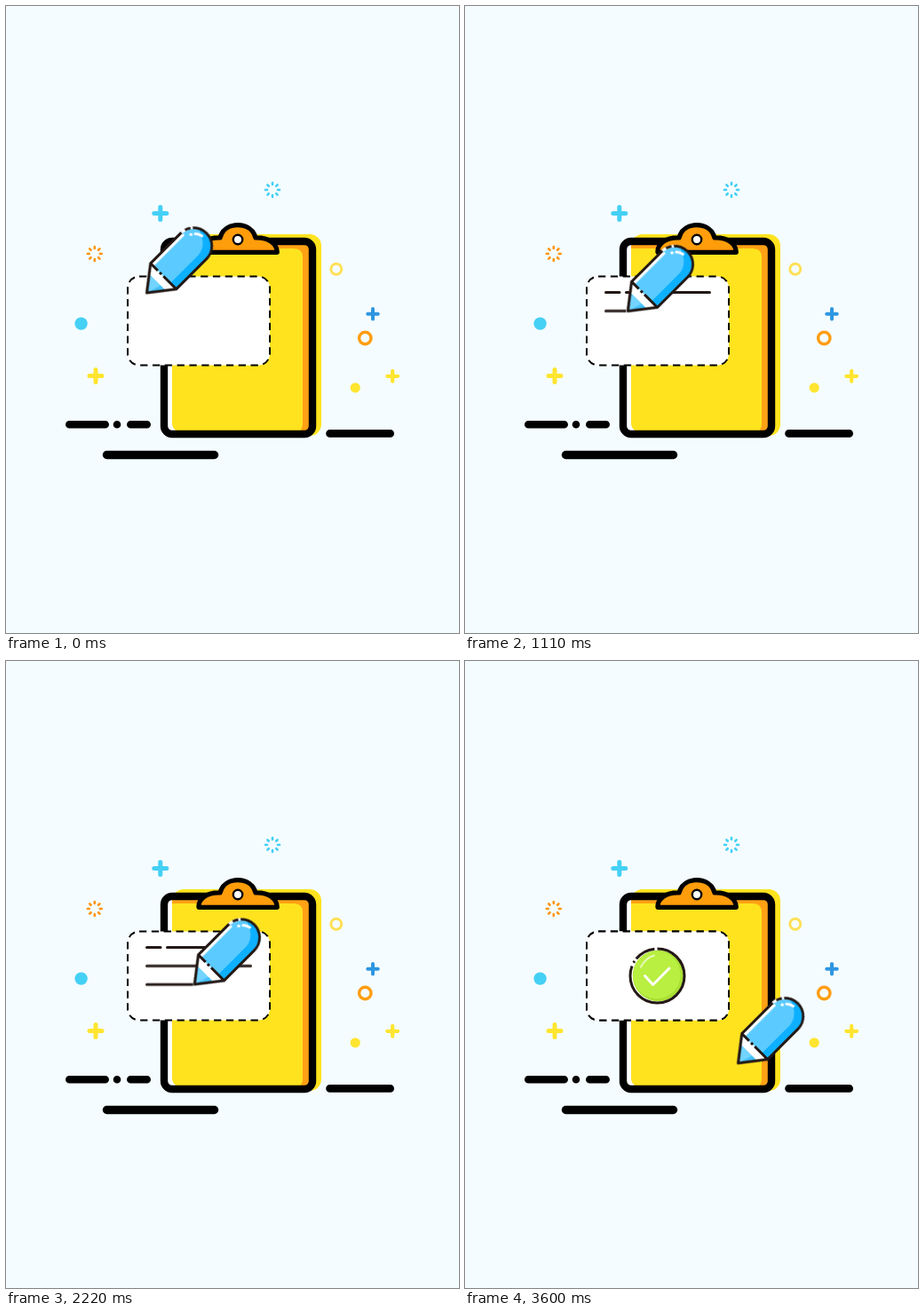
An HTML page for the animation above (5.22 s loop, 510 by 706 pixels).

```html
<!DOCTYPE html>
<html lang="en">
<head>
<meta charset="utf-8">
<title>Clipboard</title>
<style>
  html, body { margin: 0; width: 100%; height: 100%; overflow: hidden; background: #f4fcff; }
  svg { display: block; width: 100%; height: 100%; }
  .round { fill: none; stroke-linecap: round; stroke-linejoin: round; }
  .ink { stroke: #231815; stroke-width: 3; }
  .white { stroke: #fff; stroke-width: 3; }
  .card { fill: #fff; stroke: #000; stroke-width: 2; stroke-dasharray: 8.3 5.52; }
  .cover { fill: #fff; transform-origin: 284px 0; }
</style>
</head>
<body>
<svg viewBox="0 0 510 706">
  <rect width="510" height="706" fill="#f4fcff"/>
  <g id="decor" class="round"></g>

  <g class="round" stroke="#000" stroke-width="8.6">
    <path d="M71.3 471.3H111.7M125 471.3h.01M140.3 471.3H158.7M364.5 481.4H432.7"/>
    <path d="M113.5 505.5H234.5" stroke-width="9.4"/>
  </g>

  <g id="board">
    <rect x="187" y="257" width="168" height="227" rx="13" fill="#ffe31e"/>
    <rect x="178" y="265" width="167" height="217" rx="9" fill="#fff"/>
    <path d="M187 268H341V479H187Z" fill="#ffa115"/>
    <path d="M182 466H187Q187 478 195 479H182Z" fill="#fff"/>
    <path d="M187 273H324Q334 273 334 283V469Q334 477 330 479H195Q187 478 187 469Z" fill="#ffe31e"/>
    <rect x="178" y="265" width="167" height="217" rx="9" fill="none" stroke="#000" stroke-width="8.4"/>
    <path d="M217 277.3C216.500 268 226 260.500 241 261C243.500 251 252 246.700 261 246.700S278.500 251 281 261C296 260.500 305 268 305.300 277.300Z"
      fill="#ff9d0a" stroke="#000" stroke-width="5.200" stroke-linejoin="round"/>
    <circle cx="261" cy="263" r="5.200" fill="#fff" stroke="#000" stroke-width="2.400"/>
  </g>

  <rect class="card" x="137" y="304.500" width="160" height="100" rx="13"/>
  <g id="rows"></g>

  <g id="done">
    <rect class="card" x="137" y="304.500" width="160" height="100" rx="13"/>
    <circle cx="216.500" cy="354.500" r="30.500" fill="#fff"/>
    <circle cx="217.500" cy="354.500" r="28.700" fill="#a9e033"/>
    <circle cx="215.800" cy="353.500" r="26.800" fill="#b9ef40"/>
    <circle class="round ink" cx="216.500" cy="354.500" r="30.500" pathLength="360"
      stroke-linecap="butt" style="stroke-linecap:butt" stroke-dasharray="291 8 4 6 45 6"
      transform="rotate(-90 216.500 354.500)"/>
    <path class="round" stroke="#e6fab8" stroke-width="2" d="M198 344.500Q203 334.500 213 331.500"/>
    <path class="round white" d="M202.500 354.500L211.700 364.500L230 346"/>
  </g>

  <g id="pencil">
    <!-- tip at the origin, body along the x axis -->
    <g transform="rotate(-45)">
      <path d="M0 0L26.5-20.5H74.6A20.5 20.5 0 0 1 74.6 20.5H26.5Z" fill="#fff"/>
      <path d="M0 0L17-13.2V13.2Z" fill="#72d4ff"/>
      <path d="M0 0L17 5V13.2Z" fill="#45c0fb"/>
      <path d="M26.5-16H74.6V-20.5A20.5 20.5 0 0 1 74.6 20.5H26.5Z" fill="#5bcbff"/>
      <path d="M26.5 20.5V11H71Q86 10 92.500-10A20.500 20.500 0 0 1 74.600 20.500Z" fill="#0db0ff"/>
      <path class="round" stroke="#fff" stroke-width="2.600" d="M29-17H75"/>
      <path class="round white" d="M81.300-11.500l.6.400M85.600-8.500Q88.600-5.500 89.300-1.500"/>
      <path class="round white" d="M74.600-20.500A20.500 20.500 0 0 1 90-13.500"/>
      <path class="round ink" style="stroke-linecap:butt" d="M0 0L26.5-20.5H74.6A20.5 20.5 0 0 1 74.6 20.5H26.5Z"
        stroke-dasharray="82.600 5 6.500 2.600 400"/>
      <path class="ink" d="M26.500-20.500V-9M26.500-6V-3M26.500 0V20.500" stroke-width="2.600"/>
    </g>
  </g>
</svg>

<script>
const $ = id => document.getElementById(id);
const STEP = 30, LAST = 174;

// Static decoration
const plus = (x, y, size, w, color) => {
  const r = (size - w) / 2;
  return `<path d="M${x - r} ${y}h${2 * r}M${x} ${y - r}v${2 * r}" stroke="${color}" stroke-width="${w}"/>`;
};
const spark = (x, y, color) => Array.from({ length: 8 }, (_, i) =>
  `<path d="M6 0H8" transform="translate(${x} ${y}) rotate(${i * 45})" stroke="${color}" stroke-width="2.600"/>`).join('');
const ring = (x, y, r, w, color) =>
  `<circle cx="${x}" cy="${y}" r="${r}" stroke="${color}" stroke-width="${w}"/>`;
const dot = (x, y, r, color) => `<circle cx="${x}" cy="${y}" r="${r}" fill="${color}"/>`;

$('decor').innerHTML = [
  plus(173.8, 233.5, 19, 5, '#45d0f5'),
  plus(101, 416.500, 19, 5, '#ffe52f'),
  plus(413, 346.800, 15.500, 4, '#2e96e0'),
  plus(435.200, 416.800, 16, 4.200, '#ffe52f'),
  spark(300, 207, '#45d0f5'),
  spark(99.800, 279, '#ff9510'),
  ring(371.800, 296.200, 6, 3, '#ffe055'),
  ring(404.300, 374, 6.700, 3.400, '#ff9d0f'),
  dot(84.600, 357.600, 7.200, '#45d0f5'),
  dot(393.200, 429.800, 5.600, '#ffe52f')
].join('');

// Each key is [step, value]; the value advances once per step
function play(el, prop, keys) {
  const frames = keys.map(([at, value], i) => {
    const n = i + 1 < keys.length ? keys[i + 1][0] - at : 0;
    return { [prop]: value, offset: at / LAST, easing: n ? `steps(${n}, end)` : 'linear' };
  });
  el.animate(frames, { duration: LAST * STEP, iterations: Infinity });
}

// Written rows: a white cover shrinks to the right
const rows = [
  { y: 322.5, from: 0, to: 30, end: 278, d: 'M158.500 0H174M181.500 0H275.500' },
  { y: 343.4, from: 31, to: 60, end: 278, d: 'M158.500 0H275.500' },
  { y: 364.3, from: 61, to: 90, end: 278, d: 'M158.500 0H224.500M231.500 0h1M239.500 0H275.500' },
  { y: 385.3, from: 91, to: 105, end: 248, d: 'M158.500 0H244.500' }
];
$('rows').innerHTML = rows.map(r => `<g transform="translate(0 ${r.y})">
  <path class="round ink" d="${r.d}"/>
  <rect class="cover" x="156" y="-4" width="128" height="8"/></g>`).join('');
document.querySelectorAll('.cover').forEach((el, i) => {
  const { from, to, end } = rows[i];
  const rest = `scaleX(${(284 - end) / 128})`;
  play(el, 'transform', [[0, 'scaleX(1)'], [from, 'scaleX(1)'], [to, rest], [LAST, rest]]);
});

const path = [
  [0, 158.5, 323], [30, 278.5, 321],
  [31, 158.5, 344], [60, 278.5, 342],
  [61, 158.5, 365], [90, 278.5, 363],
  [91, 158.5, 386], [105, 248, 385],
  [120, 307.5, 452.8], [LAST, 307.5, 452.8]
];
play($('pencil'), 'transform', path.map(([at, x, y]) => [at, `translate(${x}px, ${y}px)`]));
play($('done'), 'opacity', [[0, 0], [110, 0], [120, 1], [LAST, 1]]);
</script>
</body>
</html>
```
